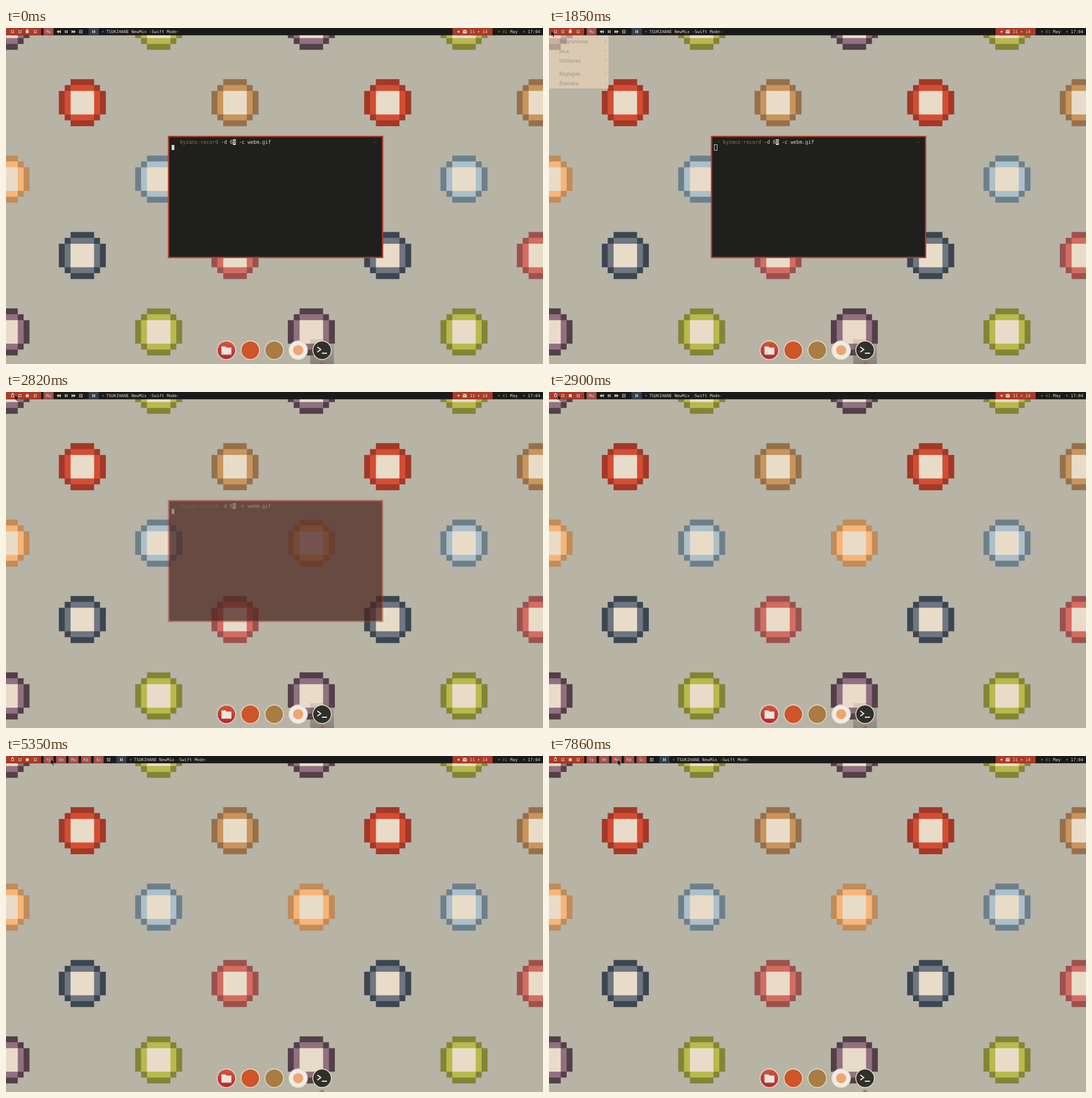
Recreate the animation shown at these times as an HTML page with a canvas. Size 947 by 592 pixels, loop 8 s.

```html
<!DOCTYPE html>
<html lang="fr">
<head>
<meta charset="utf-8">
<style>
  html, body { margin: 0; width: 100%; height: 100%; overflow: hidden; background: #b7b3a5; }
  canvas { display: block; }
</style>
</head>
<body>
<canvas id="stage" width="947" height="592"></canvas>
<script>
const stage = document.getElementById('stage');
const ctx = stage.getContext('2d');
const LOOP = 8000;
const CREAM = '#e8dcc9', RED = '#ab3a28', DARK = '#1a1a19', OLIVE = '#857f3f';
const BAR_HEIGHT = 12.8;
const BAR_FONT = '7.4px "DejaVu Sans Mono", monospace';
const TERM_FONT = '8.6px "DejaVu Sans Mono", monospace';
const MENU_FONT = '8px "DejaVu Sans", sans-serif';

function box(x, y, w, h, color) {
  ctx.fillStyle = color;
  ctx.fillRect(x, y, w, h);
}

function frame(x, y, w, h, color, line = 1) {
  ctx.strokeStyle = color;
  ctx.lineWidth = line;
  ctx.strokeRect(x + line / 2, y + line / 2, w - line, h - line);
}

function label(text, x, y, color, font = BAR_FONT, align = 'left') {
  ctx.font = font;
  ctx.fillStyle = color;
  ctx.textAlign = align;
  ctx.fillText(text, x, y);
}

function disc(x, y, r, fill) {
  ctx.beginPath();
  ctx.arc(x, y, r, 0, Math.PI * 2);
  ctx.fillStyle = fill;
  ctx.fill();
}

function shape(points, color) {
  ctx.beginPath();
  points.forEach(([x, y]) => ctx.lineTo(x, y));
  ctx.closePath();
  ctx.fillStyle = color;
  ctx.fill();
}

const progress = (t, from, to) => Math.min(1, Math.max(0, (t - from) / (to - from)));

function withOpacity(opacity, paint) {
  if (opacity <= 0) return;
  ctx.save();
  ctx.globalAlpha = opacity;
  paint();
  ctx.restore();
}

// Wallpaper: staggered pixel medallions, two alternating colours per row
const PITCH = 134.62, CELL = 10.36;
const PURPLE = ['#524048', '#927080'], GREEN = ['#848437', '#b9b94c'];
const ROWS = [
  [PURPLE, GREEN],
  [['#a23828', '#d44d33'], ['#96704a', '#c9955d']],
  [['#c08c5a', '#f7b577'], ['#6c808c', '#adc0ca']],
  [['#3b4651', '#6f7680'], ['#9c524c', '#d46c62']],
  [PURPLE, GREEN],
];

function medallion(cx, cy, [dark, light]) {
  const block = (halfW, halfH, color) =>
    box(cx - halfW * CELL, cy - halfH * CELL, halfW * 2 * CELL, halfH * 2 * CELL, color);
  block(2, 4, dark);
  block(3, 3, dark);
  block(4, 2, dark);
  block(2, 3, light);
  block(3, 2, light);
  block(2, 2, CREAM);
}

function wallpaper() {
  box(0, 0, 947, 592, '#b7b3a5');
  ROWS.forEach((pair, row) => {
    for (let i = 0; i < 4; i++) {
      medallion((i * 2 + row % 2) * PITCH, -3 + row * PITCH, pair[i % 2]);
    }
  });
}

function dock(t) {
  withOpacity(1 - progress(t, 2820, 3320), () => {
    const shade = ctx.createLinearGradient(0, 548, 0, 592);
    shade.addColorStop(0, 'rgba(100,88,88,.14)');
    shade.addColorStop(1, 'rgba(90,80,82,.5)');
    box(536.5, 548, 41.8, 44, shade);
  });
  const glow = ctx.createRadialGradient(557.5, 592, 0, 557.5, 592, 6);
  glow.addColorStop(0, 'rgba(180,70,50,.9)');
  glow.addColorStop(1, 'rgba(180,90,60,0)');
  box(550, 586, 15, 6, glow);

  const red = ctx.createLinearGradient(0, 551, 0, 585);
  red.addColorStop(0, '#d4593a');
  red.addColorStop(1, '#b3252f');
  [red, '#cf5428', '#a87c42', '#eeece6', '#2f302c'].forEach((fill, i) => {
    const x = 388.6 + i * 42.2;
    disc(x, 567.7, 17.1, '#e3d8c8');
    disc(x, 567.7, 15.5, fill);
  });
  // folder
  box(380, 561, 8, 4, '#efe4dc');
  box(380, 563, 17.5, 12.5, '#efe4dc');
  disc(515.2, 567.7, 9, '#eda672');
  // prompt
  ctx.strokeStyle = '#eee8dc';
  ctx.lineWidth = 2;
  ctx.beginPath();
  ctx.moveTo(549, 562);
  ctx.lineTo(555, 566.5);
  ctx.lineTo(549, 571);
  ctx.moveTo(557, 573);
  ctx.lineTo(566, 573);
  ctx.stroke();
}

function terminal(t) {
  box(285.5, 190, 379.8, 215.4, RED);
  box(287.9, 192.3, 375, 210.8, '#1f1f1e');
  label('◦', 296.5, 204, '#6b6750', TERM_FONT);
  label('byzanz-record', 306.8, 204, OLIVE, TERM_FONT);
  label('-d 6', 379.3, 204, '#dcd5bd', TERM_FONT);
  box(400, 196, 5.3, 10, '#e4dac2');
  label('0', 400, 204, DARK, TERM_FONT);
  label('-c webm.gif', 410.4, 204, '#dcd5bd', TERM_FONT);
  label('~', 648.5, 204, '#4c4c48', TERM_FONT);
  const unfocused = t >= 1770 && t < 2400;
  const blinkedOff = t >= 600 && t < 1200;
  if (unfocused) frame(291, 205, 6, 11, '#c9c8c2');
  else if (!blinkedOff) box(292, 206, 5, 9, '#d0cfc8');
}

const terminalOpacity = t => t < 2820 ? 1 : t < 2900 ? 0.5 : 0;

// Icons of the bar, centred on x
const ICONS = {
  back: x => [x - 3.5, x].forEach(a => shape([[a, 6.5], [a + 3.5, 3.5], [a + 3.5, 9.5]], CREAM)),
  next: x => [x - 3.5, x].forEach(a => shape([[a + 3.5, 6.5], [a, 3.5], [a, 9.5]], CREAM)),
  play: x => shape([[x - 2, 3.5], [x + 3, 6.5], [x - 2, 9.5]], CREAM),
  pause: x => [x - 2.2, x + 0.8].forEach(a => box(a, 4, 1.5, 5, CREAM)),
  close: x => {
    frame(x - 3, 3.5, 6, 6, '#aaa596');
    ctx.beginPath();
    for (const s of [-1, 1]) {
      ctx.moveTo(x - 2, 6.5 - 2 * s);
      ctx.lineTo(x + 2, 6.5 + 2 * s);
    }
    ctx.stroke();
  },
};
const PLAYER = ['back', 'pause', 'next'];
const dot = x => box(x - 1.5, 5, 3, 3, '#55554d');

// Buttons shown at a time, each with the icons unfolded after it
function buttons(t) {
  if (t < 4140) return [['Mu', PLAYER]];
  const whileOpen = (from, to, icons) => t >= from && t < to ? icons : [];
  return [
    ['Yp', whileOpen(4670, 5350, ['play', 'pause', 'close'])],
    ['Vm', whileOpen(5950, 6570, ['play', 'pause', 'close'])],
    ['Mu', whileOpen(7160, 7860, [...PLAYER, 'close'])],
    ['Kb', []],
    ['Sc', []],
  ];
}

function workspaces(t) {
  const windowAt = t < 2820 ? 2 : 0;
  for (let i = 0; i < 4; i++) {
    const x = Math.round(8.6 + i * 13.3);
    if (i === 2) box(x, 4, 5, 5, CREAM);
    else frame(x, 4, 5, 5, '#e0bfae');
    if (i === windowAt) box(x + 1, 2, 3, 1.5, CREAM);
  }
}

function bar(t) {
  box(0, 0, 947, BAR_HEIGHT, DARK);
  box(0, 0, 62, BAR_HEIGHT, RED);
  workspaces(t);

  let x = 75;
  for (const [name, icons] of buttons(t)) {
    box(x - 8.8, 0, 17.6, BAR_HEIGHT, '#a1514c');
    label(name, x, 9, '#e6cfc0', BAR_FONT, 'center');
    icons.forEach((icon, i) => ICONS[icon](x + 18 + i * 13.1));
    x += 22.1 + icons.length * 13.15;
  }
  x -= 4.5;
  ICONS.close(Math.round(x));
  box(x + 13.6, 0, 18, BAR_HEIGHT, '#33414d');
  ICONS.pause(x + 22.6);
  dot(x + 39);
  label('TSUKIHANE NewMix -Swift Mode-', x + 44.6, 9, '#dcd8cc');

  box(787.6, 0, 70.6, BAR_HEIGHT, RED);
  box(796.5, 5, 3, 3, CREAM);
  box(805.5, 3.5, 7, 6, CREAM);
  ctx.strokeStyle = RED;
  ctx.lineWidth = 0.9;
  ctx.beginPath();
  ctx.moveTo(805.5, 4);
  ctx.lineTo(809, 7);
  ctx.lineTo(812.5, 4);
  ctx.stroke();
  label('11 + 14', 818, 9, CREAM);
  dot(869.5);
  label('01', 875.5, 9, OLIVE);
  label('May', 889, 9, '#dcd8cc');
  dot(913.5);
  label('17:04', 920, 9, '#dcd8cc');
}

const MENU = [['Programmes', 23.5], ['Jeux', 40.5], ['Utilitaires', 57.5], ['Réglages', 80.5], ['Éteindre', 97.5]];

function menuOpacity(t) {
  if (t < 1770) return 0;
  if (t < 1850) return 0.3;
  if (t < 1920) return 0.6;
  return 0.9 * (1 - progress(t, 2320, 2500));
}

function menu() {
  box(0, BAR_HEIGHT, 105, 93.7, '#f3dbbb');
  for (const [name, y] of MENU) {
    label(name, 18.3, y + 3, '#5f7076', MENU_FONT);
    label('›', 98.5, y + 2.5, '#75756c', MENU_FONT);
  }
}

// Pointer stops: time, x, y
const POINTER = [
  [330, 312, 224], [1120, 2, 21], [1160, 2, 21], [1570, 4, 5], [2320, 4, 5], [2590, 15.5, 5],
  [3020, 15.5, 5], [3320, 24.5, 5], [3510, 24.5, 5], [4050, 79, 5.5], [5520, 79, 5.5],
  [5720, 95, 6], [6570, 95, 6], [7100, 121, 6.5], [LOOP, 121, 6.5],
];

function pointer(t) {
  if (t < POINTER[0][0]) return;
  const i = POINTER.findIndex(stop => stop[0] > t);
  const [t0, x0, y0] = POINTER[i - 1], [t1, x1, y1] = POINTER[i];
  const p = progress(t, t0, t1), eased = p * p * (3 - 2 * p);
  ctx.save();
  ctx.translate(x0 + (x1 - x0) * eased, y0 + (y1 - y0) * eased);
  shape([[0, 0], [0, 9.2], [2.1, 7.3], [3.7, 11], [5.3, 10.3], [3.8, 6.8], [6.6, 6.6]], '#0c0c0c');
  ctx.strokeStyle = 'rgba(225,215,200,.6)';
  ctx.lineWidth = 0.5;
  ctx.stroke();
  ctx.restore();
}

function draw(now) {
  const t = now % LOOP;
  wallpaper();
  dock(t);
  withOpacity(terminalOpacity(t), () => terminal(t));
  withOpacity(menuOpacity(t), menu);
  bar(t);
  pointer(t);
  requestAnimationFrame(draw);
}
requestAnimationFrame(draw);
</script>
</body>
</html>
```
